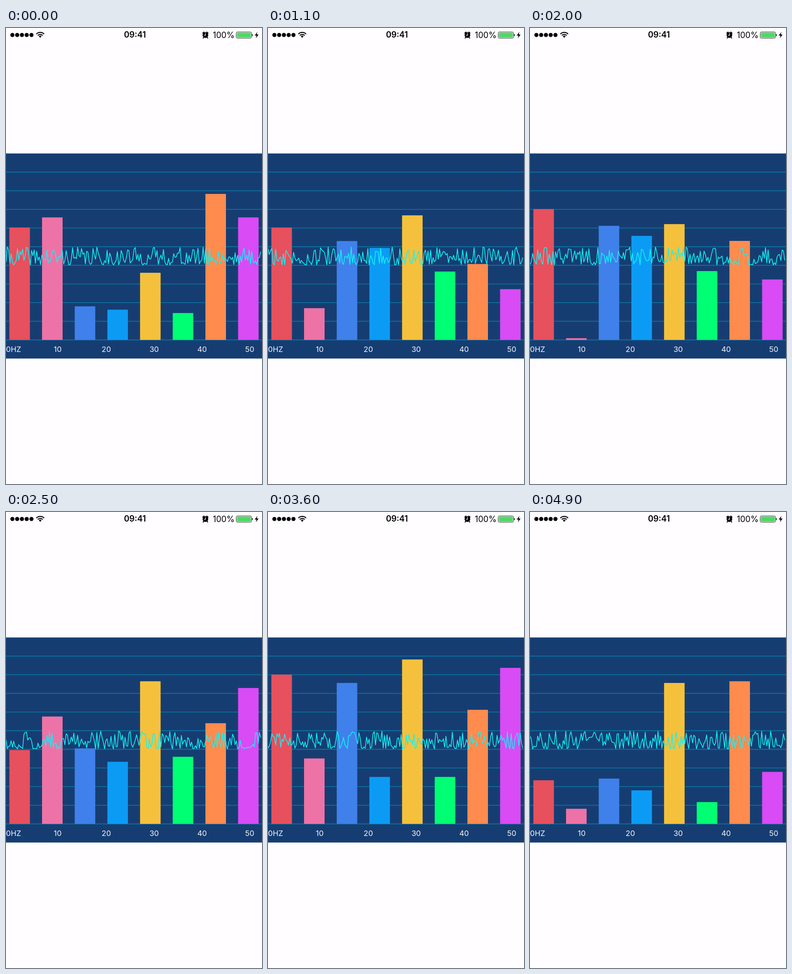
These frames come from a looping animation (561 by 998 pixels, 5000 ms). An HTML page:

```html
<!DOCTYPE html>
<html lang="en">
<head>
<meta charset="utf-8">
<style>
  html, body { margin: 0; width: 100%; height: 100%; overflow: hidden; background: #fffdff; }
  svg { display: block; width: 561px; height: 998px; }
  text { font-family: Inter, Roboto, sans-serif; }
</style>
</head>
<body>
<svg viewBox="0 0 561 998">
  <g id="signal"></g>
  <g fill="none" stroke="#000" stroke-width="2.3">
    <path d="M66.5 13.2a12 12 0 0 1 17 0M69.6 16.3a7.6 7.6 0 0 1 10.8 0"/>
    <path d="M72 18.2a4.3 4.3 0 0 1 6 0L75 21.4z" fill="#000" stroke="none"/>
  </g>
  <text x="282.5" y="21.4" font-size="18" font-weight="600" text-anchor="middle">09:41</text>
  <g stroke-linecap="round" fill="none">
    <path d="M431.2 11.2l2.8-2.4M442.8 11.2l-2.8-2.4M433 21l-1 1M441 21l1 1" stroke="#000" stroke-width="2"/>
    <circle cx="437" cy="15.5" r="6.2" fill="#000"/>
    <path d="M437.3 11.8v4h-3" stroke="#fff" stroke-width="1.2"/>
  </g>
  <text x="477" y="21.6" font-size="18" text-anchor="middle">100%</text>
  <rect x="504.5" y="8.7" width="33.6" height="13.6" rx="2.6" fill="none" stroke="#222" stroke-width="1"/>
  <rect x="506" y="10.2" width="30.6" height="10.6" rx="1.4" fill="#4cd964"/>
  <path d="M539 13v5q2-.8 2-2.5T539 13z" fill="#222"/>
  <path d="M551 8.5l-6 8h4l-1.500 6 6-8.300h-4z"/>
  <rect y="274.6" width="561" height="448.800" fill="#163d72"/>
  <g id="grid" stroke="#0878a4" stroke-width="1.6"></g>
  <g id="bars"></g>
  <path id="wave" fill="none" stroke="#10f2f6" stroke-width="1.6" stroke-linejoin="round"/>
  <g id="labels" fill="#f4f6fa" font-size="16.5"></g>
</svg>
<script>
const NS = 'http://www.w3.org/2000/svg';
const $ = id => document.getElementById(id);

function add(parent, tag, attrs, text = '') {
  const el = document.createElementNS(NS, tag);
  for (const key in attrs) el.setAttribute(key, attrs[key]);
  el.textContent = text;
  return $(parent).appendChild(el);
}

const ROW = 40.8, BASE = 274.6 + 10 * ROW, FULL = 9 * ROW;
const COLORS = ['#e7505d', '#ed73a6', '#4080ea', '#0c9bf4', '#f5c13d', '#00ff72', '#ff8b4e', '#d84bf5'];

// Bar heights in percent; one move to the next row at each second
const LEVELS = [
  [67, 73, 20, 18, 40, 16, 87, 73],
  [38, 66, 35, 36, 88, 40, 9, 15],
  [78, 1, 68, 62, 69, 41, 59, 36],
  [44, 64, 45, 37, 85, 40, 60, 81],
  [89, 39, 84, 28, 98, 28, 68, 93],
  [26, 9, 27, 20, 84, 13, 85, 31]
];

const TICK = 100, LOOP = 5000, MOVE = 200;
const POINTS = 200, GAP = 561 / POINTS, SHIFT = 30;

for (let i = 0; i < 5; i++) add('signal', 'circle', { cx: 14 + i * 10.45, cy: 15.3, r: 4.5 });
for (let i = 1; i <= 10; i++) {
  const y = 274.6 + i * ROW;
  add('grid', 'line', { x1: 0, x2: 561, y1: y, y2: y });
}
['0HZ', '10', '20', '30', '40', '50'].forEach((s, i) =>
  add('labels', 'text', { x: i * 104.8, y: 709.3 }, s));
const bars = COLORS.map((fill, i) => add('bars', 'rect', { x: 7.4 + i * 71.6, width: 45, fill }));

let seed = 41;
function random() {
  seed = (seed * 1664525 + 1013904223) % 4294967296;
  return seed / 4294967296;
}
const samples = Array.from({ length: POINTS + SHIFT * LOOP / TICK }, () => 518.6 - 39.4 * random() ** 1.4);

function draw(now) {
  const step = Math.floor(now % LOOP / TICK);
  const time = step * TICK;
  const second = Math.floor(time / 1000);
  const ease = 1 - (1 - Math.min(1, time % 1000 / MOVE)) ** 1.86;
  bars.forEach((bar, i) => {
    const from = LEVELS[second][i], to = LEVELS[second + 1][i];
    const height = (from + (to - from) * ease) / 100 * FULL;
    bar.setAttribute('y', BASE - height);
    bar.setAttribute('height', height);
  });
  const view = samples.slice(step * SHIFT, step * SHIFT + POINTS);
  $('wave').setAttribute('d', 'M' + view.map((y, i) => `${(i * GAP).toFixed(2)} ${y.toFixed(2)}`).join('L'));
}

const start = performance.now();
function frame() {
  draw(performance.now() - start);
  requestAnimationFrame(frame);
}
frame();
</script>
</body>
</html>
```
